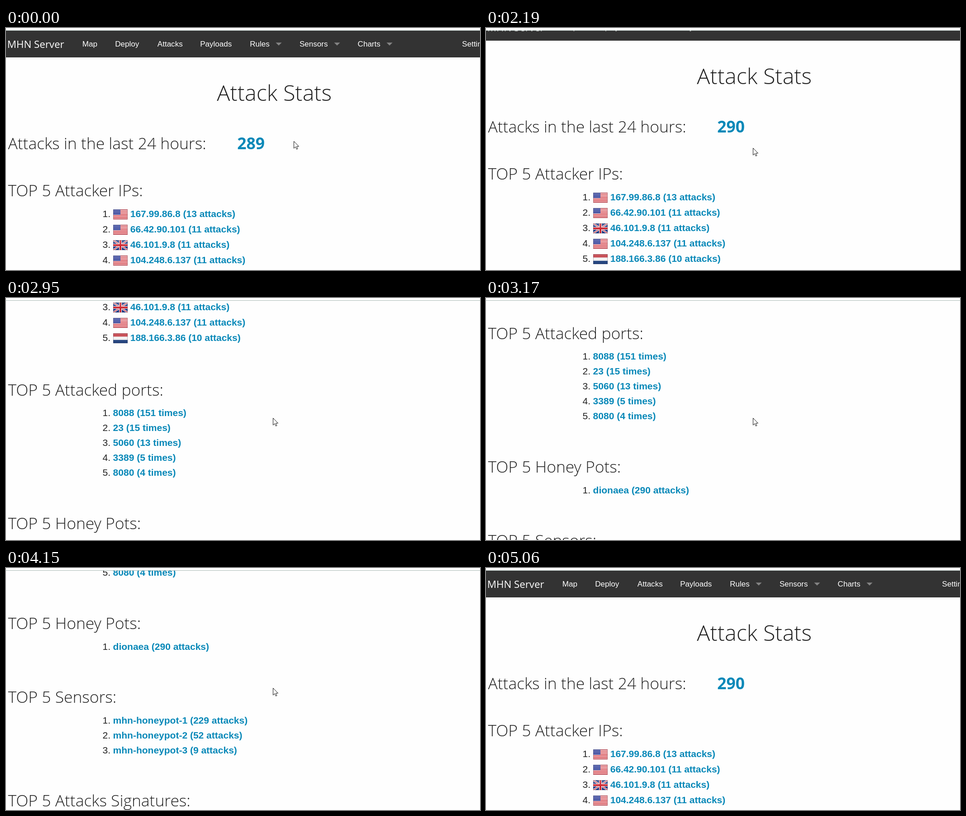
An HTML page with a canvas that plays this animation: 1048x535 px, repeating every 5.94 s.

```html
<!DOCTYPE html>
<html lang="en">
<head>
<meta charset="utf-8">
<title>Attack Stats</title>
<style>
  html, body { margin: 0; width: 100%; height: 100%; overflow: hidden; background: #fefefe; }
  canvas { display: block; }
</style>
</head>
<body>
<canvas id="stage" width="1048" height="535"></canvas>
<script>
const W = 1048, H = 535, LOOP = 5940, TOP = 6;
const ctx = document.getElementById('stage').getContext('2d');

const PAGE = '#fefefe', INK = '#222', LINK = '#0888b8', BAR = '#333';
const SANS = '"Liberation Sans", Arial, sans-serif';
const OPEN = '"Open Sans", sans-serif';
const ZOOM = 1.3125;
const font = (weight, px, family) => `${weight} ${px * ZOOM}px ${family}`;
const FONT = {
  title: font(300, 37, OPEN),
  head: font(300, 27, OPEN),
  count: font(700, 27, OPEN),
  brand: font(400, 17, OPEN),
  nav: font(400, 13, SANS),
  item: font(400, 16, SANS),
  link: font(700, 16, SANS)
};

const SCROLL = [
  [0, 0], [2190, 37], [2300, 170], [2420, 280], [2560, 292],
  [2720, 312], [2830, 380], [2950, 459], [3050, 545], [3170, 584],
  [3510, 690], [3670, 824], [3780, 868], [3900, 876],
  [4150, 835], [4260, 660], [4380, 480], [4490, 325], [4610, 170], [4730, 4],
  [4840, 1], [4950, 0]
];
// [time, x, y]
const POINTER = [[0, 636, 250], [1320, 622, 256], [1450, 602, 263], [1570, 590, 265]];
const POINTER_END = 5060;
const COUNT_UP = 120;

const MENU = [
  ['Map', 168.8], ['Deploy', 241.2], ['Attacks', 334.8], ['Payloads', 429.2],
  ['Rules', 539.2, 603], ['Sensors', 649, 732], ['Charts', 777.6, 848], ['Settings', 1008.3]
];

const LIST_GAP = 45.6;
const SECTIONS = [
  { y: 372, title: 'TOP 5 Attacker IPs:', step: 34.2, items: [
    ['167.99.86.8 (13 attacks)', 'us'],
    ['66.42.90.101 (11 attacks)', 'us'],
    ['46.101.9.8 (11 attacks)', 'gb'],
    ['104.248.6.137 (11 attacks)', 'us'],
    ['188.166.3.86 (10 attacks)', 'nl']
  ] },
  { y: 674.5, title: 'TOP 5 Attacked ports:', step: 33, items: [
    ['8088 (151 times)'], ['23 (15 times)'], ['5060 (13 times)'],
    ['3389 (5 times)'], ['8080 (4 times)']
  ] },
  { y: 970, title: 'TOP 5 Honey Pots:', step: 33, items: [['dionaea (290 attacks)']] },
  { y: 1133, title: 'TOP 5 Sensors:', step: 33, items: [
    ['mhn-honeypot-1 (229 attacks)'],
    ['mhn-honeypot-2 (52 attacks)'],
    ['mhn-honeypot-3 (9 attacks)']
  ] },
  { y: 1362, title: 'TOP 5 Attacks Signatures:', step: 33, items: [] }
];

function held(keys, t) {
  let k = keys[0];
  for (const key of keys) if (t >= key[0]) k = key;
  return k;
}

function text(str, x, y, font, color, align = 'left') {
  ctx.font = font;
  ctx.fillStyle = color;
  ctx.textAlign = align;
  ctx.fillText(str, x, y);
}

function rect(x, y, w, h, color) {
  ctx.fillStyle = color;
  ctx.fillRect(x, y, w, h);
}

function poly(points) {
  ctx.beginPath();
  for (const [x, y] of points) ctx.lineTo(x, y);
  ctx.closePath();
}

function lines(segments, width, color) {
  ctx.beginPath();
  for (const [x1, y1, x2, y2] of segments) {
    ctx.moveTo(x1, y1);
    ctx.lineTo(x2, y2);
  }
  ctx.lineWidth = width;
  ctx.strokeStyle = color;
  ctx.stroke();
}

const FW = 32, FH = 22;
const flags = {
  us() {
    const h = FH / 13;
    rect(0, 0, FW, FH, '#f6eaea');
    for (let i = 0; i < 13; i += 2) rect(0, i * h, FW, h, '#d22630');
    rect(0, 0, 16, 7 * h, '#33429a');
    for (let r = 0; r < 4; r++)
      for (let c = 0; c < 5; c++) rect(1.5 + c * 3, 1.5 + r * 2.8, 1, 1, '#9aa3d2');
  },
  gb() {
    const diagonals = [[0, 0, FW, FH], [0, FH, FW, 0]];
    const cross = [[FW / 2, 0, FW / 2, FH], [0, FH / 2, FW, FH / 2]];
    rect(0, 0, FW, FH, '#1f3a86');
    lines(diagonals, 3.8, '#eeeaf0');
    lines(diagonals, 1.4, '#cb2e3a');
    lines(cross, 6.2, '#f2eef0');
    lines(cross, 3.8, '#cc2430');
  },
  nl() {
    rect(0, 0, FW, FH, '#f2f2f2');
    rect(0, 0, FW, FH / 3, '#c0363e');
    rect(0, FH * 2 / 3, FW, FH / 3, '#264680');
  }
};

function flag(name, x, y) {
  ctx.save();
  ctx.translate(x, y);
  ctx.beginPath();
  ctx.rect(0, 0, FW, FH);
  ctx.clip();
  flags[name]();
  const gloss = ctx.createLinearGradient(0, 0, 0, FH);
  gloss.addColorStop(0, 'rgba(255,255,255,.18)');
  gloss.addColorStop(0.5, 'rgba(255,255,255,.08)');
  gloss.addColorStop(0.51, 'rgba(255,255,255,0)');
  rect(0, 0, FW, FH, gloss);
  ctx.lineWidth = 1;
  ctx.strokeStyle = 'rgba(50,40,60,.3)';
  ctx.strokeRect(0.5, 0.5, FW - 1, FH - 1);
  ctx.restore();
}

function drawNav() {
  rect(0, TOP, W, 59, BAR);
  text('MHN Server', 2.8, 44, FONT.brand, '#fff');
  for (const [label, x, arrow] of MENU) {
    text(label, x, 41, FONT.nav, '#fff');
    if (!arrow) continue;
    poly([[arrow - 6.6, 32.2], [arrow + 6.6, 32.2], [arrow, 38.8]]);
    ctx.fillStyle = 'rgba(255,255,255,.4)';
    ctx.fill();
  }
}

function drawSection({ y, title, step, items }) {
  text(title, 4.4, Math.round(y), FONT.head, INK);
  items.forEach(([label, country], i) => {
    const base = Math.round(y + LIST_GAP + i * step);
    text(`${i + 1}.`, 213.5, base, FONT.item, INK);
    if (country) flag(country, 237, base - 17);
    text(label, country ? 274.7 : 236.6, base, FONT.link, LINK);
  });
}

function drawPointer(x, y) {
  ctx.save();
  ctx.translate(x + 0.5, y + 0.5);
  poly([[0, 0], [0, 15.5], [3.6, 12.2], [6, 17.6], [8.4, 16.6], [6.1, 11.3], [11, 11.3]]);
  ctx.fillStyle = '#fff';
  ctx.fill();
  ctx.lineWidth = 1;
  ctx.strokeStyle = '#111';
  ctx.stroke();
  ctx.restore();
}

function draw(t) {
  rect(0, 0, W, H, PAGE);

  ctx.save();
  ctx.beginPath();
  ctx.rect(0, TOP, W, H - TOP);
  ctx.clip();
  ctx.translate(0, -held(SCROLL, t)[1]);
  drawNav();
  text('Attack Stats', 593.3, 161, FONT.title, INK, 'center');
  text('Attacks in the last 24 hours:', 4.4, 268, FONT.head, INK);
  text(t < COUNT_UP ? '289' : '290', 511.2, 268, FONT.count, LINK);
  SECTIONS.forEach(drawSection);
  ctx.restore();

  rect(0, TOP - 1, W, 1, '#abbab6');
  if (t < POINTER_END) {
    const [, x, y] = held(POINTER, t);
    drawPointer(x, y);
  }
}

const start = performance.now();
function tick() {
  draw((performance.now() - start) % LOOP);
  requestAnimationFrame(tick);
}
tick();
</script>
</body>
</html>
```
